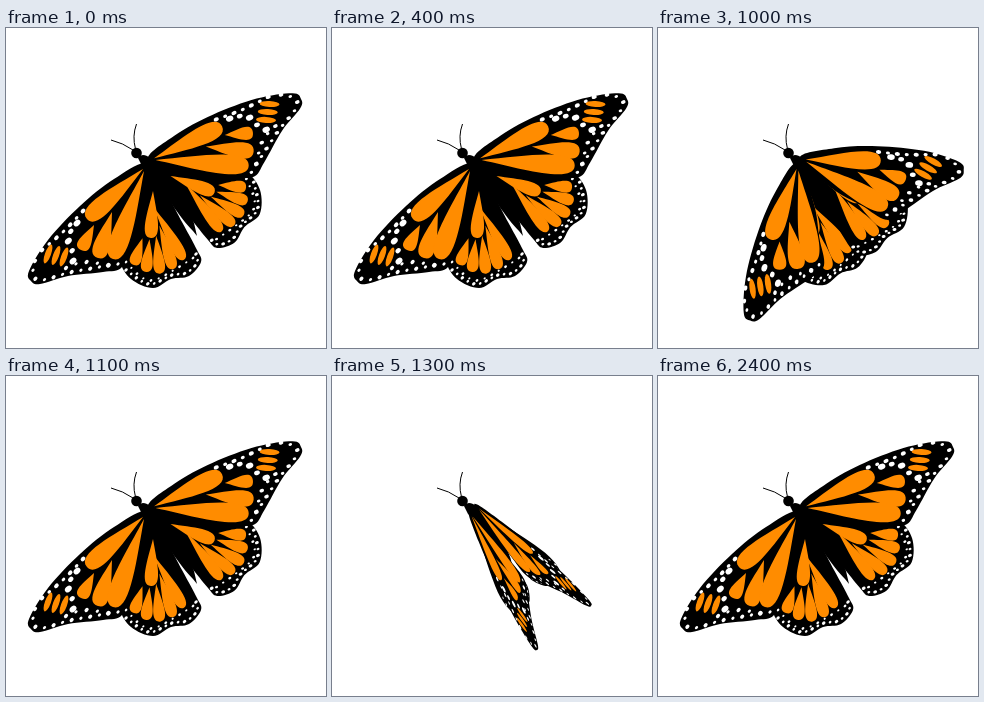
An HTML page that plays this animation: 320 by 320 pixels, repeating every 2900 ms.

```html
<!DOCTYPE html>
<html lang="en">
<head>
<meta charset="utf-8">
<title>Butterfly</title>
<style>
  html, body { margin: 0; width: 100%; height: 100%; overflow: hidden; background: #fff; }
  svg { display: block; width: 100vw; height: 100vh; }
</style>
</head>
<body>
<svg viewBox="0 0 320 320">
  <defs>
    <g id="hind" transform="translate(-138 -138)"></g>
    <g id="fore" transform="translate(-138 -138)"></g>
  </defs>
  <path id="tail" d="M-6 5 C4 13 14 29 24 43 C32 55 40 65 46 71 L50 76 L47 63 C43 51 31 31 21 15 C15 5 9 -2 5 -4 Z"/>
  <use class="left" href="#hind"/>
  <use class="right" href="#hind"/>
  <use class="left" href="#fore"/>
  <use class="right" href="#fore"/>
  <path d="M132 130 Q135 125 141 128 Q149 132 148 139 Q142 144 136 138 Z"/>
  <circle cx="130.5" cy="125" r="5.3"/>
  <path d="M127 122 Q117 115 105 112 M129.5 121 Q126 108 130.5 96" fill="none" stroke="#000"/>
</svg>
<script>
const ORANGE = '#ff8c00';
const hind = document.getElementById('hind');
const fore = document.getElementById('fore');

function add(parent, tag, attrs) {
  const el = document.createElementNS('http://www.w3.org/2000/svg', tag);
  for (const key in attrs) el.setAttribute(key, attrs[key]);
  parent.append(el);
  return el;
}

// Catmull-Rom curve through "x,y x,y ..."
function curve(text, closed) {
  const pts = text.split(' ').map(p => p.split(',').map(Number));
  const n = pts.length;
  const at = i => closed ? pts[(i + n) % n] : pts[Math.max(0, Math.min(n - 1, i))];
  let d = 'M' + pts[0];
  for (let i = 0; i < (closed ? n : n - 1); i++) {
    const [a, b, c, e] = [at(i - 1), at(i), at(i + 1), at(i + 2)];
    const c1 = b.map((v, k) => v + (c[k] - a[k]) / 6);
    const c2 = c.map((v, k) => v - (e[k] - b[k]) / 6);
    d += `C${c1} ${c2} ${c}`;
  }
  return d;
}

// orange cell: pointed at (x, y), round at (u, v)
function cell(parent, [x, y], [u, v], width) {
  const length = Math.hypot(u - x, v - y);
  const nx = (y - v) / length * width, ny = (u - x) / length * width;
  const side = (k, t) => [x + (u - x) * t + nx * k, y + (v - y) * t + ny * k];
  const d = `M${x},${y}C${side(0.35, 0.45)} ${side(0.95, 1)} ${u},${v}` +
            `C${side(-0.95, 1)} ${side(-0.35, 0.45)} ${x},${y}`;
  add(parent, 'path', { d, fill: ORANGE });
}

// evenly spaced white spots along a curve
function spots(parent, text, count, r) {
  const line = add(parent, 'path', { d: curve(text), fill: 'none' });
  const length = line.getTotalLength();
  for (let i = 0; i < count; i++) {
    const p = line.getPointAtLength(length * i / (count - 1));
    const size = r * (i % 2 ? 0.85 : 1.1);
    add(parent, 'ellipse', {
      rx: size * 1.2, ry: size * 0.9, fill: '#fff',
      transform: `translate(${p.x} ${p.y}) rotate(-45)`
    });
  }
  line.remove();
}

function drawFore() {
  const edge = '141,136 108,151 74,178 42,212 23,243 25,253 34,256 62,248 97,244 116,239 125,212 136,180';
  add(fore, 'path', { d: curve(edge, true) });
  cell(fore, [137, 141], [81, 191], 18);
  cell(fore, [88, 197], [75, 222], 13);
  cell(fore, [106, 184], [92, 230], 16);
  cell(fore, [138, 143], [107, 231], 19);
  for (let i = 0; i < 3; i++) {
    add(fore, 'ellipse', {
      rx: 3, ry: 10, fill: ORANGE,
      transform: `translate(${42 + 8 * i} ${226 + 1.5 * i}) rotate(20)`
    });
  }
  spots(fore, '77,183 58,203 36,222', 7, 2);
  spots(fore, '71,195 62,209 66,222 67,233', 5, 2.9);
  spots(fore, '29,233 27,247 36,252 66,244 112,236', 12, 1.8);
  spots(fore, '60,240 78,234 102,237', 5, 1.8);
}

function drawHind() {
  const edge = '140,140 128,175 118,205 114,232 125,251 147,260 165,251 183,248 195,234 191,222 176,194 147,140';
  add(hind, 'path', { d: curve(edge, true) });
  cell(hind, [147, 163], [145, 210], 13);
  for (let i = 0; i < 5; i++) {
    const a = (108 - 12 * i) * Math.PI / 180;
    const ray = r => [147 + r * Math.cos(a), 178 + r * Math.sin(a)];
    cell(hind, ray(34 - i ** 3 / 2), ray(62 + 6 * Math.sin(Math.PI * i / 4)), 11.5);
  }
  spots(hind, '120,242 143,256 166,247 180,245 191,235 190,226', 15, 1.5);
  spots(hind, '120,234 135,249 148,252 168,242 187,230', 11, 1.2);
}

drawFore();
drawHind();

// fore, hind: turn of each wing; squash: along and across the folded wing
const open = { fore: 0, hind: 0, lean: 0, squash: '1 1', tail: 1 };
const half = { fore: -27, hind: -8, lean: -1, squash: '1 1', tail: 1 };
const shut = { fore: -67, hind: -21, lean: -4, squash: '.94 .36', tail: 0.8 };
const cycle = [open, half, shut, half];

const LOOP = 2900;
const times = [0, 100, 200, 300, 400, 800, 900, 1000, 1100, 1200, 1300, 2300, 2400];
const FOLD = 68;
const MIRROR = 'rotate(56.5) scale(1 -1) rotate(-56.5)';

function setPose(pose) {
  for (const use of document.querySelectorAll('use')) {
    const part = use.getAttribute('href').slice(1);
    const place = use.matches('.left') ? 'translate(138 138)' : 'translate(145 130)';
    const flip = use.matches('.left') ? '' : MIRROR;
    use.setAttribute('transform', `${place} rotate(${pose.lean}) ${flip}
      rotate(${FOLD}) scale(${pose.squash}) rotate(${pose[part] - FOLD})`);
  }
  document.getElementById('tail').setAttribute('transform', `translate(141 132) scale(${pose.tail})`);
}

let start;
function tick(now) {
  start ??= now;
  const t = Math.max(0, now - start) % LOOP;
  const step = times.filter(time => time <= t).length - 1;
  setPose(cycle[step % cycle.length]);
  requestAnimationFrame(tick);
}
setPose(open);
requestAnimationFrame(tick);
</script>
</body>
</html>
```
